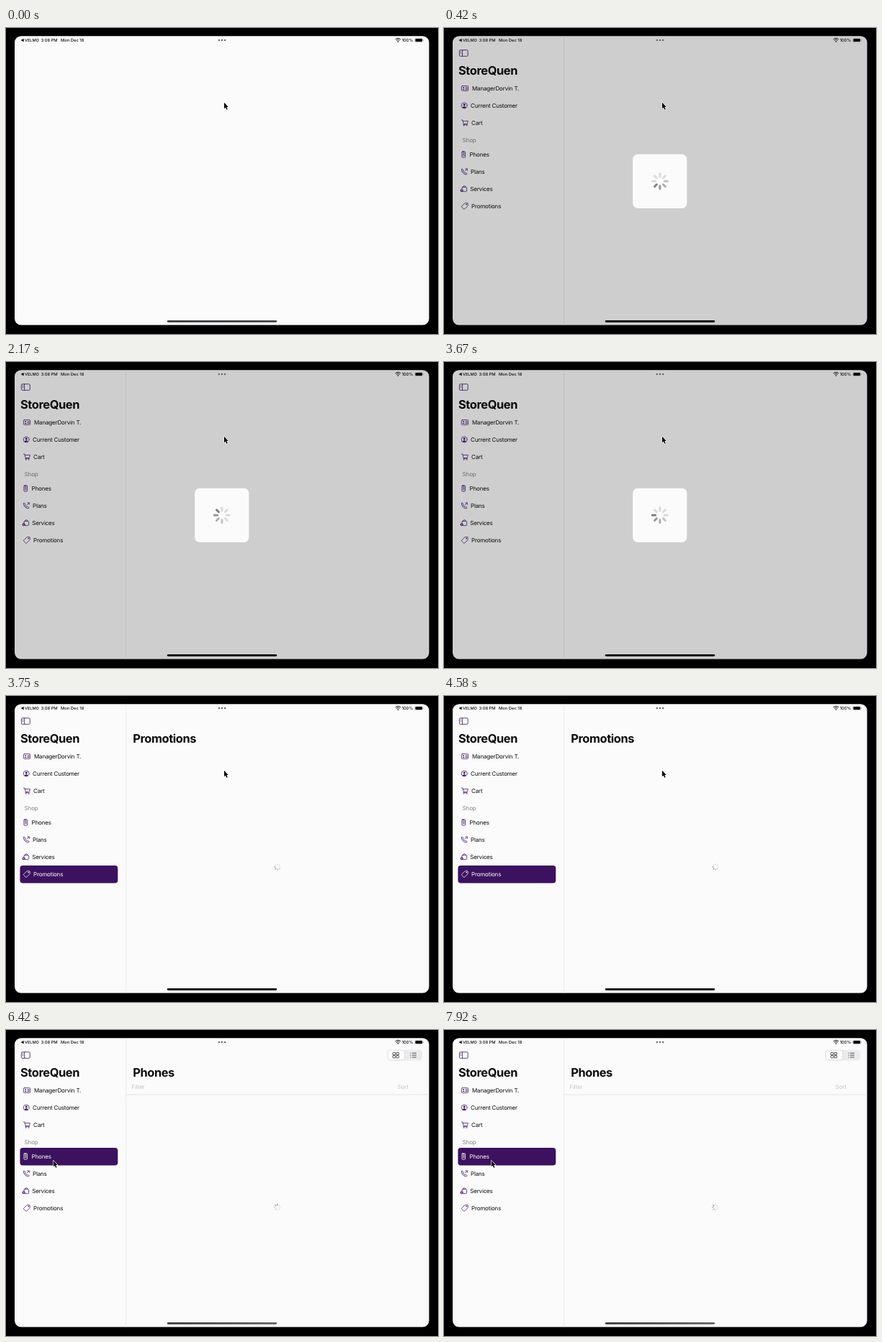
Write an HTML page with a canvas that moves like this. It is 600 px wide and 426 px high and loops after 8 s.

```html
<!DOCTYPE html>
<html lang="en">
<head>
<meta charset="utf-8">
<title>Store app</title>
<style>
html, body { margin: 0; width: 100%; height: 100%; overflow: hidden; background: #000; }
canvas { display: block; width: 600px; height: 426px; }
</style>
</head>
<body>
<canvas id="stage"></canvas>
<script>
const W = 600, H = 426, LOOP = 8000;
const T = { menu: 250, promo: 3750, cards: 4830, move: 5600, arrive: 6250, phones: 6330 };
const PAPER = '#fcfbfc', PURPLE = '#3c125f', INK = '#0b0b0d', MUTED = '#858589';

const canvas = document.getElementById('stage');
const ctx = canvas.getContext('2d');
const dpr = window.devicePixelRatio || 1;
canvas.width = W * dpr;
canvas.height = H * dpr;
ctx.textRendering = 'geometricPrecision';

const clamp = v => Math.max(0, Math.min(1, v));
const ease = v => v * v * (3 - 2 * v);

function text(str, x, y, size, { weight = 400, color = INK, gap = 0 } = {}) {
  ctx.font = `${weight} ${size}px Inter, "Liberation Sans", sans-serif`;
  ctx.letterSpacing = gap + 'px';
  ctx.fillStyle = color;
  ctx.fillText(str, x, y);
}

function box(x, y, w, h, r, fill) {
  ctx.beginPath();
  ctx.roundRect(x, y, w, h, r);
  if (fill) {
    ctx.fillStyle = fill;
    ctx.fill();
  } else ctx.stroke();
}

function disc(x, y, r, fill) {
  ctx.beginPath();
  ctx.arc(x, y, r, 0, Math.PI * 2);
  if (fill) {
    ctx.fillStyle = fill;
    ctx.fill();
  } else ctx.stroke();
}

function trace(d, fill) {
  const p = new Path2D(d);
  if (fill) {
    ctx.fillStyle = fill;
    ctx.fill(p);
  } else ctx.stroke(p);
}

function line(x1, y1, x2, y2) {
  ctx.beginPath();
  ctx.moveTo(x1, y1);
  ctx.lineTo(x2, y2);
  ctx.stroke();
}

// Icons are drawn around their own centre.
const icons = {
  badge(c) {
    box(-4.6, -3.4, 9.2, 6.8, 1);
    disc(-1.9, -1, 0.9, c);
    trace('M-3.5 1.9Q-1.9-.6-.3 1.9Z', c);
    trace('M1-1.3H3.2M1 .2H3.2M1 1.6H3.2');
  },
  person(c) {
    disc(0, 0, 4);
    disc(0, -1, 1.4, c);
    trace('M-2.6 2.5Q0-.5 2.6 2.5Q0 4.3-2.6 2.5Z', c);
  },
  cart(c) {
    trace('M-4.7-4H-3.2L-1.7 1.6H3.2L4.4-2.4H-2.7M-1.7 1.6L-2.2 2.7H3.4');
    disc(-1.3, 4, 0.7, c);
    disc(2.7, 4, 0.7, c);
  },
  phone(c) {
    box(-2.3, -4.2, 4.6, 8.4, 1);
    ctx.globalAlpha = 0.45;
    box(-1.4, -2.7, 2.8, 5.2, 0.2, c);
    ctx.globalAlpha = 1;
    line(-0.7, -3.4, 0.7, -3.4);
  },
  call() {
    trace('M-3.9-3.3Q-2.7-4.5-1.8-2.8Q-1.2-1.8-2.1-1Q-1.3 1 .8 2Q1.7 1 2.8 1.8Q4.3 2.7 3.1 3.7Q1.3 5-1.8 2.1Q-4.9-1-3.9-3.3Z');
    trace('M.4-.5L3.9-4M1.4-4H3.9V-1.5');
  },
  bag(c) {
    box(-2.6, -2.4, 6.6, 6.1, 1);
    trace('M-1-2.4Q-1-4.4.7-4.4T2.4-2.4');
    disc(-3, 2.2, 2, c);
    ctx.save();
    ctx.strokeStyle = PAPER;
    ctx.lineWidth = 0.5;
    trace('M-4 2.2H-2M-3 1.2V3.2');
    ctx.restore();
  },
  tag() {
    trace('M-4.3 1.2Q-4.8.6-4.2 0L.1-4Q.6-4.4 1.3-4.4H3.6Q4.4-4.4 4.4-3.5V-1.1Q4.4-.5 3.9 0L-.2 4.1Q-.8 4.7-1.4 4.1Z');
    disc(2.4, -2.4, 0.6);
  }
};

function icon(name, x, y, color) {
  ctx.save();
  ctx.translate(x, y);
  ctx.strokeStyle = color;
  ctx.lineWidth = 0.75;
  ctx.lineJoin = ctx.lineCap = 'round';
  icons[name](color);
  ctx.restore();
}

const menu = [
  ['ManagerDorvin T.', 84, 39, 'badge', 29],
  ['Current Customer', 108, 37, 'person', 28.2],
  ['Cart', 132, 38, 'cart', 29],
  ['Phones', 176, 35.5, 'phone', 27.2],
  ['Plans', 200, 37, 'call', 28.4],
  ['Services', 224, 36.2, 'bag', 27.6],
  ['Promotions', 248, 38, 'tag', 28.8]
];

const cards = [
  [['Olvex miVeon 14 New', 'Line $250 IR with $100', 'VPM'], ['Get one for $149.99 with a new number']],
  [['Tarvung Solixo B27 5G', 'New Line $420 IR'], ['Get one for $49.99 with a new number']],
  [['OrvLune V300 New Line', '$149.99 IR'], ['Get one FREE with a new number']],
  [['QVL 40 ZU New Line', '$190 IR'], ['Get one for $9.99 with a new number']],
  [['Vandorel vand K Quillo', '5G (2021) New Line', '$300 IR'], ['Get one for $19.99 with a new number']],
  [['Store quen test coupon', 'Free V30'], ['Get a New Number and Save with S1 d']],
  [['Store quen test coupon', '$65 plan get one free'], ['Get a New Number n the $65 plan and', 'Save with S1 d']]
];

const title = (str, x) => text(str, x, 64.8, 16.4, { weight: 700, gap: -0.4 });

function statusBar() {
  const s = { weight: 500 };
  trace('M20.5 17L24.6 14.7V19.3Z', INK);
  text('VELMO', 26, 19.1, 5.6, s);
  text('3:08 PM', 48.5, 19.1, 5.8, { weight: 500, gap: -0.05 });
  text('Mon Dec 18', 76, 19.1, 5.8, s);
  [295.9, 300, 304.1].forEach(x => disc(x, 17, 1.15, '#5b5b5e'));
  ctx.strokeStyle = INK;
  ctx.lineWidth = 1;
  for (const r of [5.2, 3.2]) {
    ctx.beginPath();
    ctx.arc(544.5, 19.5, r, -Math.PI * 0.76, -Math.PI * 0.24);
    ctx.stroke();
  }
  disc(544.5, 18.8, 0.9, INK);
  text('100%', 549.7, 19.1, 5.8, s);
  ctx.strokeStyle = '#8b8b8e';
  ctx.lineWidth = 0.5;
  box(567.8, 14.4, 11, 5.3, 1.5);
  box(568.5, 15.1, 9.6, 3.9, 1, INK);
  box(579.4, 16.2, 0.7, 1.8, 0.3, '#8b8b8e');
}

function sidebar(active) {
  ctx.strokeStyle = '#e1e1e5';
  ctx.lineWidth = 0.7;
  line(166.5, 11, 166.5, 414);
  ctx.strokeStyle = PURPLE;
  ctx.lineWidth = 0.8;
  box(21.4, 30.7, 11.8, 8.6, 1.4);
  line(25.6, 30.7, 25.6, 39.3);
  ctx.lineWidth = 0.6;
  [32.7, 34.2, 35.7].forEach(y => line(22.7, y, 24.3, y));
  title('StoreQuen', 20);
  text('Shop', 25.5, 159.2, 8, { color: MUTED, gap: -0.1 });
  for (const [label, y, x, name, ix] of menu) {
    const on = label === active;
    if (on) box(19.4, y - 11.9, 135.9, 24.3, 4, PURPLE);
    icon(name, ix, y, on ? '#fff' : PURPLE);
    text(label, x, y + 2.9, 8, { color: on ? '#fff' : INK, gap: -0.17 });
  }
}

function card([head, sub], i) {
  const x = 178 + (i % 3) * 134, y = 106 + Math.floor(i / 3) * 119.6;
  ctx.save();
  ctx.shadowColor = 'rgba(0,0,0,.17)';
  ctx.shadowBlur = 12 * dpr;
  ctx.shadowOffsetY = dpr;
  box(x, y, 130, 116, 5, '#fdfdfd');
  ctx.restore();
  head.forEach((s, n) => text(s, x + 8, y + 20.9 + n * 12, 9.6, { weight: 600, gap: -0.13 }));
  const top = y + 23.7 + head.length * 12;
  sub.forEach((s, n) => text(s, x + 8, top + n * 7.5, 5.75));
  text('Learn more', x + 8, y + 105, 8, { color: PURPLE, gap: -0.1 });
}

// Eight spokes; the darkest one advances every 100 ms.
function spinner(x, y, r, width, time, light, dark) {
  const lead = Math.floor(time / 100) % 8;
  ctx.save();
  ctx.translate(x, y);
  ctx.lineCap = 'round';
  ctx.lineWidth = width;
  for (let i = 0; i < 8; i++) {
    const age = (lead - i + 8) % 8;
    const tone = Math.round(light - (light - dark) * Math.max(0, 1 - age / 4));
    ctx.strokeStyle = `rgb(${tone},${tone},${tone})`;
    ctx.save();
    ctx.rotate(i * Math.PI / 4);
    line(0, -r * 0.53, 0, -r + width / 2);
    ctx.restore();
  }
  ctx.restore();
}

function promotions(t) {
  title('Promotions', 176.2);
  if (t < T.cards) {
    spinner(377, 238, 5, 1.1, t + 100, 222, 135);
    return;
  }
  const s = { gap: -0.16 };
  text('Promotions are displayed to detail best offers, and how to qualify. The best promo for device and rate plan', 182.8, 81.9, 7.6, s);
  text('chosen is automatically applied.', 182.8, 92.8, 7.6, s);
  cards.forEach(card);
}

function phones(t) {
  title('Phones', 176.2);
  text('Filter', 174.3, 81.6, 8, { color: '#c3c3c7', gap: -0.1 });
  text('Sort', 543.6, 81.6, 8, { color: '#c3c3c7', gap: -0.1 });
  ctx.strokeStyle = '#dcdce0';
  ctx.lineWidth = 0.8;
  line(167, 90, 588, 90);
  box(529.8, 27.8, 48.4, 14.6, 4, '#ebebed');
  ctx.save();
  ctx.shadowColor = 'rgba(0,0,0,.2)';
  ctx.shadowBlur = 2 * dpr;
  box(530.6, 28.6, 22.6, 13, 3.4, '#fff');
  ctx.restore();
  ctx.strokeStyle = '#29292b';
  ctx.lineWidth = 0.8;
  for (const x of [537.2, 542]) for (const y of [31.4, 35.6]) box(x, y, 3.7, 3.2, 0.6);
  for (const y of [32.2, 35.1, 38]) {
    disc(562, y, 0.55, '#29292b');
    line(564, y, 570, y);
  }
  spinner(376.8, 246.8, 5, 1.1, t, 222, 135);
}

function loading(t) {
  const a = clamp((t - 200) / 220);
  ctx.fillStyle = `rgba(0,0,0,${0.18 * a})`;
  ctx.fillRect(12, 11, 576, 403);
  ctx.globalAlpha = a;
  box(262.2, 175.8, 75.2, 75.2, 7, PAPER);
  spinner(299.9, 213.3, 12, 3, t + 150, 218, 128);
  ctx.globalAlpha = 1;
}

function homeBar(t) {
  const busy = t >= T.menu && t < T.cards;
  const g = ctx.createLinearGradient(224, 0, 376, 0);
  g.addColorStop(0, busy ? '#000' : '#39393b');
  g.addColorStop(1, busy ? '#000' : t < T.menu ? '#444446' : '#626264');
  box(223.8, 407, 152.4, 2.7, 1.35, g);
}

function cursor(t) {
  const k = ease(clamp((t - T.move) / (T.arrive - T.move)));
  const arrow = 'M0 0V9L2 7.2L3.6 10.8L5.1 10.1L3.6 6.7H6.2Z';
  ctx.save();
  ctx.translate(303 - 237.2 * k, 103.8 + 78 * k);
  ctx.scale(0.93, 0.93);
  ctx.strokeStyle = '#fff';
  ctx.lineWidth = 1.3;
  ctx.lineJoin = 'round';
  trace(arrow);
  trace(arrow, '#000');
  ctx.restore();
}

function draw(t) {
  ctx.setTransform(dpr, 0, 0, dpr, 0, 0);
  ctx.fillStyle = '#000';
  ctx.fillRect(0, 0, W, H);
  ctx.save();
  box(12, 11.2, 575.6, 402.4, 9, PAPER);
  ctx.clip();
  if (t >= T.menu) sidebar(t < T.promo ? '' : t < T.phones ? 'Promotions' : 'Phones');
  if (t >= T.phones) phones(t);
  else if (t >= T.promo) promotions(t);
  if (t >= T.menu && t < T.promo) loading(t);
  statusBar();
  homeBar(t);
  cursor(t);
  ctx.restore();
}

const start = performance.now();
function tick() {
  draw((performance.now() - start) % LOOP);
  requestAnimationFrame(tick);
}
tick();
</script>
</body>
</html>
```
